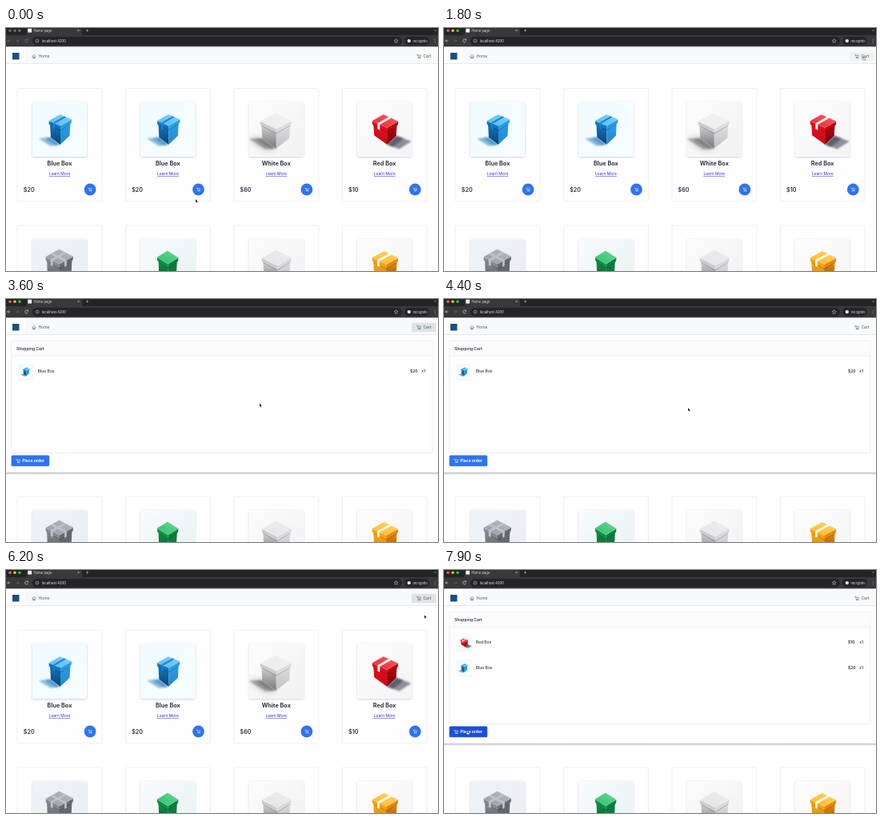
An HTML page for the animation above (8000 ms loop, 540 by 304 pixels).

```html
<!DOCTYPE html>
<html lang="en">
<head>
<meta charset="utf-8">
<title>Box shop</title>
<style>
  html, body { margin: 0; width: 100%; height: 100%; overflow: hidden; background: #fefdff; }
  svg { display: block; width: 100vw; height: 100vh; }
  text { font-family: Inter, "Liberation Sans", sans-serif; }
</style>
</head>
<body>
<svg id="stage" viewBox="0 0 540 304" preserveAspectRatio="none">
  <defs>
    <filter id="soft" x="-30%" y="-30%" width="160%" height="160%"><feGaussianBlur stdDeviation=".8"/></filter>
    <filter id="haze" x="-60%" y="-60%" width="220%" height="220%"><feGaussianBlur stdDeviation="4"/></filter>
    <filter id="lift" x="-10%" y="-10%" width="120%" height="125%">
      <feDropShadow dx="0" dy="0.7" stdDeviation="0.9" flood-color="#334" flood-opacity=".28"/>
    </filter>
    <linearGradient id="edge" x2="0" y2="1">
      <stop offset="0" stop-color="#77777d" stop-opacity=".5"/>
      <stop offset="1" stop-color="#77777d" stop-opacity="0"/>
    </linearGradient>
    <linearGradient id="dim" x2="0" y2="1">
      <stop offset=".1" stop-color="#000" stop-opacity="0"/>
      <stop offset="1" stop-color="#000"/>
    </linearGradient>
    <linearGradient id="shine" x1="1" x2="0" y2="1">
      <stop offset="0" stop-color="#fff" stop-opacity=".3"/>
      <stop offset="1" stop-color="#fff" stop-opacity="0"/>
    </linearGradient>
    <clipPath id="photo"><rect width="68" height="68" rx="1.5"/></clipPath>
    <g id="trolley" fill="none" stroke-width=".55" stroke-linecap="round" stroke-linejoin="round">
      <path d="M-2.5-2.1h.9l.9 3.1h2.5l.7-2.3h-3.8"/>
      <circle cx="-.5" cy="2.1" r=".35"/><circle cx="1.6" cy="2.1" r=".35"/>
    </g>
  </defs>
  <g id="page"></g>
  <g id="drawer"></g>
  <g id="header"></g>
  <g id="browser"></g>
  <path id="arrow" d="M0 0V4.4L1.1 3.5 1.8 5.1 2.5 4.8 1.8 3.2H3.2Z" fill="#000" stroke="#fff" stroke-width=".35"/>
  <path id="hand" d="M-.4 .2Q0-.3.4.2V1.7L1.9 2Q2.4 2.2 2.3 2.9L1.9 4.4H-.6L-1.6 2.7Q-1.5 2-.4 2.6Z"
        fill="#fff" stroke="#222" stroke-width=".45"/>
</svg>
<script>
const $ = id => document.getElementById(id);
const LOOP = 8000, BLUE = '#2f73f2', BLUE_HOVER = '#1d4fd8', PAPER = '#fefdff';

const rect = (x, y, w, h, fill, extra = '') =>
  `<rect x="${x}" y="${y}" width="${w}" height="${h}" fill="${fill}" ${extra}/>`;
const circle = (x, y, r, fill, extra = '') => `<circle cx="${x}" cy="${y}" r="${r}" fill="${fill}" ${extra}/>`;
const text = (x, y, size, fill, label, weight = 400, extra = '') =>
  `<text x="${x}" y="${y}" font-size="${size}" fill="${fill}" font-weight="${weight}" ${extra}>${label}</text>`;
const line = (d, stroke, width = .6, extra = '') =>
  `<path d="${d}" fill="none" stroke="${stroke}" stroke-width="${width}" ${extra}/>`;
const poly = (fill, points, extra = '') => `<polygon points="${points.join(' ')}" fill="${fill}" ${extra}/>`;
const trolley = (x, y, color, scale = 1) =>
  `<use href="#trolley" transform="translate(${x} ${y}) scale(${scale})" stroke="${color}"/>`;

// l, m, r: left, front and right corner of the lid's top; cast: how far the shadow falls.
const kinds = {
  blue: { name: 'Blue Box', price: 20, l: [20.5, 23.5], m: [35, 29.5], r: [49, 21.5], base: 53, cast: [-15, 1.5],
    colors: ['#4fbcf6', '#1273bf', '#2a9be6'], bg: '#effbff', bg2: '#f7fdff', shade: '#1a74b4', ribbon: '#1b80cc' },
  white: { name: 'White Box', price: 60, l: [14, 24], m: [34, 33.5], r: [53, 23.5], base: 58, cast: [-17, 0],
    colors: ['#ececed', '#cbcbcd', '#dcdcde'], bg: '#fdfdfd', bg2: '#f1f1f2', shade: '#626265', haze: 1 },
  red: { name: 'Red Box', price: 10, l: [18.5, 23.5], m: [37, 32], r: [51, 24], base: 53, cast: [19, 7],
    colors: ['#ee222c', '#e20e1a', '#b80812'], bg: '#fdfdfd', bg2: '#f4f4f5', shade: '#26263a', ribbon: '#fff' },
  gray: { l: [16.5, 22], m: [34, 31], r: [51, 21.5], base: 58, cast: [-14, 2],
    colors: ['#999da3', '#858a90', '#666b73'], bg: '#eef3f7', bg2: '#e8eef2', shade: '#555', ribbon: '#bfc2c7', cross: 1 },
  green: { l: [20.5, 22.5], m: [34, 31], r: [47, 23], base: 56, cast: [-14, 2],
    colors: ['#2cc269', '#0d8f45', '#0a8040'], bg: '#f8fcfd', bg2: '#e6f0f3', shade: '#174d31' },
  pale: { l: [16, 23.5], m: [35, 33], r: [53, 23], base: 58, cast: [-16, 1],
    colors: ['#e5e5e7', '#cbcbce', '#d9d9db'], bg: '#fcfcfd', bg2: '#f1f1f3', shade: '#777' },
  orange: { l: [18.5, 23], m: [36, 31.5], r: [51, 23.5], base: 56, cast: [16, 5],
    colors: ['#ffbc26', '#f7a10c', '#e88606'], bg: '#fdfdfd', bg2: '#f4f4f5', shade: '#555', ribbon: '#fff' }
};

function boxArt(k) {
  const { l, m, r, base, cast, colors: [top, left, right] } = k;
  const down = (p, d, dx = 0) => [p[0] + dx, p[1] + d];
  const mix = (a, b, t) => [a[0] + (b[0] - a[0]) * t, a[1] + (b[1] - a[1]) * t];
  const back = [l[0] + r[0] - m[0], l[1] + r[1] - m[1]];
  const tall = base - m[1], lid = 5;
  const footL = down(l, tall - 3, 2.5), footR = down(r, tall - 3, -2.5), front = [m[0], base];
  const toLeft = cast[0] < 0, foot = toLeft ? footL : footR;
  const band = (a, b, c, d, t = .36, w = .16) => poly(k.ribbon, [mix(a, b, t), mix(a, b, t + w), mix(c, d, t + w), mix(c, d, t)]);
  const face = (fill, a, b, c, d, dark) =>
    poly(fill, [a, b, c, d]) + poly('url(#dim)', [a, b, c, d], `opacity="${dark ? .42 : .12}"`);

  const shadow = [front, foot, down(foot, cast[1], cast[0]), down(front, cast[1] * .7 + .8, cast[0] * .8)];
  let out = k.haze ? poly(k.shade, shadow, 'opacity=".45" filter="url(#haze)"') : '';
  out += poly(k.shade, shadow, 'opacity=".5" filter="url(#soft)"');
  out += poly(k.shade, [front, foot, mix(shadow[1], shadow[2], .5), mix(shadow[0], shadow[3], .5)], 'opacity=".45" filter="url(#soft)"');
  out += face(left, down(l, 3, 1.5), down(m, 3), front, footL, toLeft);
  out += face(right, down(m, 3), down(r, 3, -1.5), footR, front, !toLeft);
  out += poly('#000', [down(l, lid, 1.5), down(m, lid), down(r, lid, -1.5), down(r, lid + 1, -1.5), down(m, lid + 1.3), down(l, lid + 1, 1.5)], 'opacity=".22"');
  out += poly(left, [l, m, down(m, lid), down(l, lid - .5, .3)]);
  out += poly(right, [m, r, down(r, lid - .5, -.3), down(m, lid)]);
  out += poly(top, [l, m, r, back]) + poly('url(#shine)', [l, m, r, back]);
  if (k.ribbon) {
    out += band(l, m, back, r) + band(l, m, down(l, lid + 2), down(m, lid + 2));
    if (k.cross) out += band(m, r, l, back) + band(m, r, down(m, lid + 2), down(r, lid + 2));
  }
  return out + line(`M${l}L${m}L${r}`, '#fff', .35, 'opacity=".35"');
}

Object.entries(kinds).forEach(([id, k]) => {
  document.querySelector('defs').insertAdjacentHTML('beforeend',
    `<linearGradient id="bg-${id}" x2="1" y2="1"><stop stop-color="${k.bg}"/><stop offset="1" stop-color="${k.bg2}"/></linearGradient>
     <g id="${id}">${rect(0, 0, 68, 68, '#fff', 'rx="1.5" filter="url(#lift)"')}
     <g clip-path="url(#photo)">${rect(0, 0, 68, 68, `url(#bg-${id})`)}${boxArt(k)}</g></g>`);
});
const picture = (id, x, y, scale = 1) => `<use href="#${id}" transform="translate(${x} ${y}) scale(${scale})"/>`;

function card(id, column, y) {
  const x = 14.2 + column * 135.4, k = kinds[id];
  let out = rect(x, y, 105.8, 141.3, PAPER, 'stroke="#e9ebee" stroke-width=".7" rx="1"') + picture(id, x + 18.8, y + 17.3);
  if (k.name) out +=
    text(x + 52.8, y + 96.6, 7.3, '#303844', k.name, 700, 'text-anchor="middle"') +
    text(x + 52.8, y + 108.5, 4.95, '#2929df', 'Learn More', 400, 'text-anchor="middle" text-decoration="underline"') +
    text(x + 7.6, y + 129.4, 7.2, '#303844', '$' + k.price, 600) +
    circle(x + 90.9, y + 126.5, 7.4, BLUE, `id="buy${column}"`) + trolley(x + 90.9, y + 126.5, '#fff', .88);
  return out;
}

$('page').innerHTML = rect(0, 0, 540, 304, PAPER) +
  ['blue', 'blue', 'white', 'red'].map((id, i) => card(id, i, 75.5)).join('') +
  ['gray', 'green', 'pale', 'orange'].map((id, i) => card(id, i, 247)).join('');

const cartRow = (id, row, y) => `<g id="${row}">` + picture(id, 15.3, y - 9.6, .29) +
  text(39.8, y + 1.9, 5, '#303844', kinds[id].name, 500) +
  text(505, y + 1.9, 5, '#303844', '$' + kinds[id].price, 600) +
  text(519.3, y + 1.9, 5, '#303844', 'x1', 500) + '</g>';

$('drawer').innerHTML = rect(0, 217, 540, 3, 'url(#edge)') + rect(0, 44, 540, 173, PAPER) +
  rect(6.8, 52.3, 526.2, 140.4, PAPER, 'stroke="#e6e8eb" stroke-width=".7" rx="1"') +
  rect(7.1, 52.6, 525.6, 18.2, '#fcfcfd') + line('M7 71H533', '#e6e8eb', .7) +
  text(13, 63.5, 5, '#303844', 'Shopping Cart', 600) +
  cartRow('red', 'redRow', 90.5) + cartRow('blue', 'blueRow', 90.5) +
  rect(6.6, 195.5, 47.6, 13.8, BLUE, 'id="order" rx="1.6"') + trolley(15.2, 202.4, '#fff', .95) +
  text(20.2, 204.3, 5, '#fff', 'Place order', 700);

$('header').innerHTML = rect(0, 23, 540, 21.5, '#f8f9fa') + rect(0, 23.5, 24, 20.5, '#fff') +
  line('M0 44.5H540', '#dfe2e5', .7) + rect(8, 31, 8.5, 8.5, '#1c4f80') +
  line('M32.6 35.4L35 33.1 37.4 35.4M33.3 35V37.8H36.7V35M34.5 37.7V36H35.5V37.7', '#59626e', .55) +
  text(40.5, 37.3, 4.95, '#4b5563', 'Home') +
  rect(507, 29.8, 30.7, 11.4, '#eff1f3', 'id="cartButton" rx="1.5"') +
  trolley(516, 35.4, '#59626e') + text(521.4, 37.3, 5.1, '#4b5563', 'Cart');

$('browser').innerHTML = rect(0, 0, 540, 9.5, '#242427') + rect(0, 9, 540, 14.3, '#39393c') +
  '<path d="M24 9.3Q26 9.3 26 7V2Q26 .3 28 .3H93Q95 .3 95 2V7Q95 9.3 97 9.3Z" fill="#39393c"/>' +
  [5, 11, 17].map((x, i) => circle(x, 3.2, 1.8, '#666', `id="light${i}"`)).join('') +
  rect(27.3, .8, 4.8, 4.8, '#f3f3f3') + text(34.5, 4.6, 4.2, '#dedee0', 'Home page') +
  line('M89.5 2L91.7 4.2M91.7 2L89.5 4.2M100 3.1H103.2M101.6 1.5V4.7M535.2 2.3L536.6 3.7 538 2.3', '#d3d3d5', .55) +
  `<g id="nav">${line('M5.4 16H1.8M3.4 14.4L1.8 16 3.4 17.6M27.4 15A2 2 0 1 0 27.5 16.7M27.5 13.6V15.2H25.9', '#e2e2e4')}</g>` +
  line('M12.4 16H16M14.4 14.4L16 16 14.4 17.6', '#77777a') +
  rect(33, 10.9, 462, 10.5, '#242427', 'rx="5.2"') +
  circle(39, 16.1, 2, 'none', 'stroke="#d0d0d2" stroke-width=".55"') + line('M39 15.8V17.2M39 14.8V15.3', '#d0d0d2', .5) +
  text(44.8, 17.6, 4.25, '#ededee', 'localhost:4200') +
  '<path d="M487.7 13.6l.7 1.6 1.8.2-1.4 1.2.4 1.8-1.5-1-1.5 1 .4-1.8-1.4-1.2 1.8-.2z" fill="none" stroke="#d7d7d9" stroke-width=".5"/>' +
  rect(498, 11, 31, 10.3, '#242427', 'rx="5.1"') + circle(503.8, 16.1, 2.2, '#e2e2e4') +
  text(508.6, 17.6, 4.1, '#ededee', 'Incognito') +
  [14.2, 16.1, 18].map(y => circle(536.6, y, .45, '#e2e2e4')).join('');

// Cursor stops: time, x, y
const path = [
  [0, 237, 214], [300, 240, 204], [700, 240, 204], [1500, 524.5, 35.5], [3000, 524.5, 35.5],
  [3700, 305, 136], [4500, 305, 136], [4950, 524.5, 35.5], [5100, 524.5, 35.5], [5400, 447.3, 187],
  [5600, 511, 202], [5850, 511, 202], [6300, 524.5, 35.5], [6500, 524.5, 35.5], [6700, 479.5, 64.5],
  [7250, 300, 150], [7750, 29.5, 201.5], [LOOP, 29.5, 201.5]
];
function cursorAt(t) {
  const i = path.findIndex(p => p[0] > t), a = path[i - 1], b = path[i];
  const u = (t - a[0]) / (b[0] - a[0]), e = u * u * (3 - 2 * u);
  return [a[1] + (b[1] - a[1]) * e, a[2] + (b[2] - a[2]) * e];
}

const show = (id, on) => $(id).setAttribute('visibility', on ? 'inherit' : 'hidden');
const fill = (id, color) => $(id).setAttribute('fill', color);
const within = (t, a, b) => t >= a && t < b;

function render(t) {
  const [x, y] = cursorAt(t);
  const over = (l, top, w, h) => within(x, l, l + w) && within(y, top, top + h);
  const active = t >= 400;
  const firstOpen = within(t, 2900, 5000), open = firstOpen || t >= 6400;
  const focused = within(t, 2900, 3800) || within(t, 5000, 6900);
  const onCart = over(507, 29.8, 30.7, 11.4), onOrder = open && over(6.6, 195.5, 47.6, 13.8);
  let pointing = onCart || onOrder;

  ['#ff5f57', '#febc2e', '#28c840'].forEach((c, i) => fill('light' + i, active ? c : '#68686b'));
  $('nav').setAttribute('opacity', active ? 1 : .4);
  show('cartButton', onCart || focused);
  fill('cartButton', focused ? '#dfe2e6' : '#eff1f3');
  for (let i = 0; i < 4; i++) {
    const hover = active && !open && Math.hypot(x - 105.1 - i * 135.4, y - 202) < 7.4;
    fill('buy' + i, hover ? BLUE_HOVER : BLUE);
    pointing = pointing || hover;
  }
  show('drawer', open);
  show('blueRow', within(t, 3200, 5000) || t >= 6900);
  show('redRow', t >= 6900);
  $('blueRow').setAttribute('transform', `translate(0 ${firstOpen ? 0 : 31.7})`);
  fill('order', onOrder ? BLUE_HOVER : BLUE);
  show('arrow', !pointing);
  show('hand', pointing);
  for (const id of ['arrow', 'hand']) $(id).setAttribute('transform', `translate(${x} ${y})`);
}

const start = performance.now();
function tick() {
  render((performance.now() - start) % LOOP);
  requestAnimationFrame(tick);
}
tick();
</script>
</body>
</html>
```
